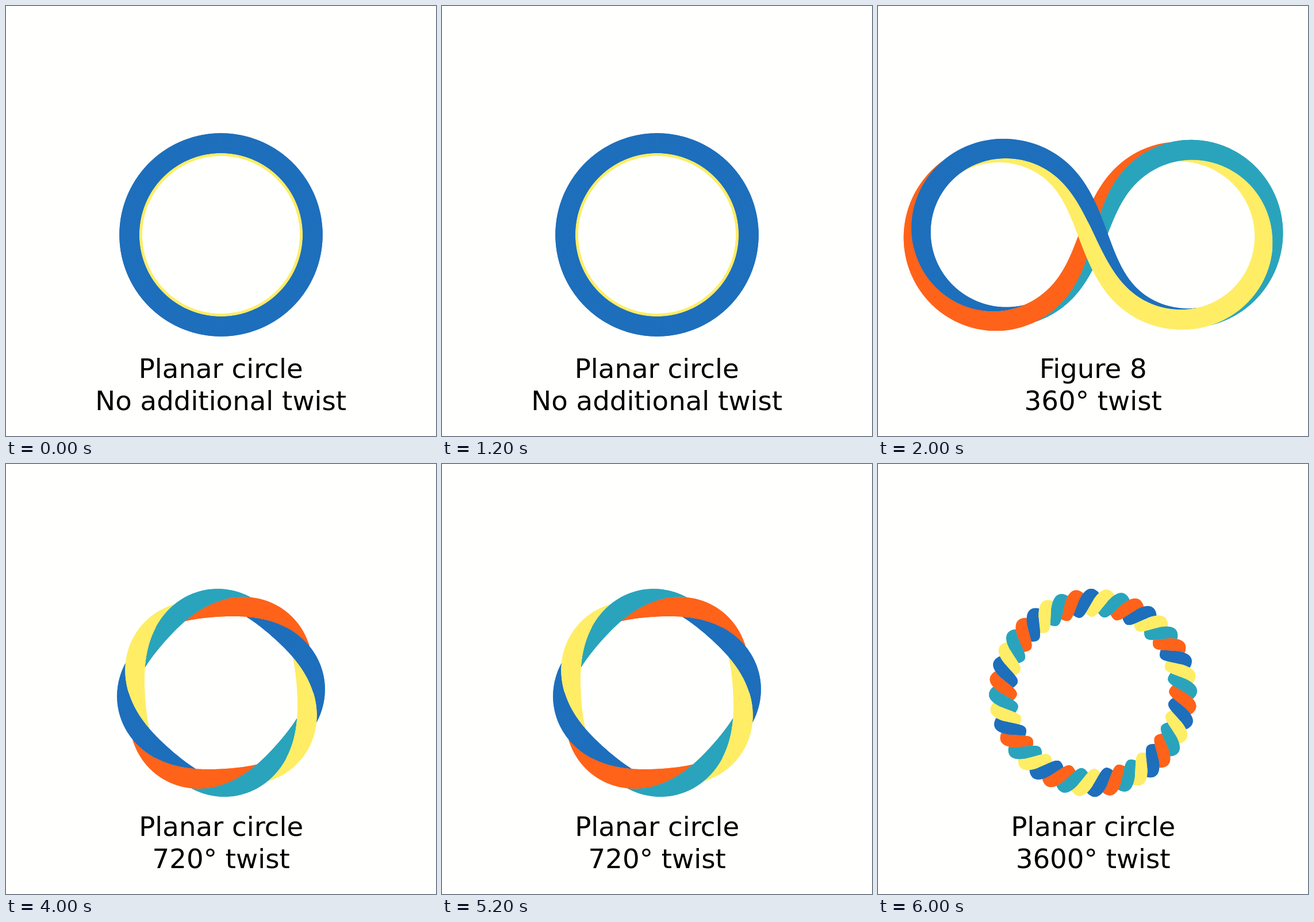
Recreate the animation shown at these times as an HTML page with a canvas. Size 748x748 px, loop 8 s.

```html
<!DOCTYPE html>
<html lang="en">
<head>
<meta charset="utf-8">
<title>Twist and writhe</title>
<style>
html, body { margin: 0; height: 100%; overflow: hidden; background: #fffffd; }
canvas { display: block; }
</style>
</head>
<body>
<canvas id="stage" width="748" height="748"></canvas>
<script>
const ctx = document.getElementById("stage").getContext("2d");
const COLORS = ["#1e6fbc", "#ffed66", "#2aa4bc", "#ff631a"]; // in order around the bar
const HOLD = 2000, STEPS = 720, CAMERA = 960;
const CORNER = 17 * Math.SQRT2; // bar axis to edge
const { PI, sin, cos, abs } = Math;

// Each path gives the axis point, the sideways normal and the roll of the bar.
function circle(turns, roll) {
  return u => {
    const a = 2 * PI * u, nx = cos(a), ny = sin(a);
    return { x: 156.6 * nx, y: 156.6 * ny, z: 0, nx, ny, roll: roll - turns * a };
  };
}

// Two round loops; the strands straighten out gradually towards the crossing.
function figureEight(u) {
  const r = 146, ease = 113, slope = 1.2114, lift = 28;
  const heading = d => slope - (d < ease ? d * d / (2 * ease) : d - ease / 2) / r;
  const apex = ease / 2 + r * slope, quarter = apex + r * PI / 2;
  const s = (4 * u - 1) * quarter;
  const upper = s <= quarter;
  const t = upper ? s : s - 2 * quarter;
  const d = abs(t), side = t < 0 ? -1 : 1, over = upper ? 1 : -1;
  let x = 0, y = 0;
  for (let i = 0, n = 200; i < n; i++) {
    const h = heading((i + 0.5) * d / n);
    x += cos(h) * d / n;
    y += sin(h) * d / n;
  }
  const z = d < apex ? lift * cos(PI / 2 * d / apex) ** 2 : 0;
  const h = heading(d);
  return {
    x: over * side * x, y: side * y, z: over * z,
    nx: sin(h), ny: -over * cos(h),
    roll: 0.715 - PI / 2 * s / quarter
  };
}

const SCENES = [
  { path: circle(0, PI / 2), text: ["Planar circle", "No additional twist"], x: 373.7 },
  { path: figureEight, text: ["Figure 8", "360° twist"], x: 374.2 },
  { path: circle(2, PI / 4), text: ["Planar circle", "720° twist"], x: 374.2 },
  { path: circle(10, PI * 5 / 4), text: ["Planar circle", "3600° twist"], x: 374.2 }
];

function project(p, angle) {
  const out = CORNER * cos(angle), z = p.z + CORNER * sin(angle);
  const k = CAMERA / (CAMERA - z);
  return { x: 374 + k * (p.x + out * p.nx), y: 398 + k * (p.y + out * p.ny), z };
}

function bar(path) {
  const rings = Array.from({ length: STEPS }, (_, i) => {
    const p = path(i / STEPS);
    return COLORS.map((_, k) => project(p, p.roll + (k - 0.5) * PI / 2));
  });
  const quads = [];
  rings.forEach((a, i) => {
    const b = rings[(i + 2) % STEPS]; // overlap by one step to hide seams
    COLORS.forEach((color, k) => {
      const n = (k + 1) % 4, pts = [a[k], a[n], b[n], b[k]];
      const [p, q, r, s] = pts;
      const facing = (r.x - p.x) * (s.y - q.y) - (r.y - p.y) * (s.x - q.x) < 0;
      if (facing) quads.push({ color, pts, z: p.z + q.z + r.z + s.z });
    });
  });
  return quads.sort((a, b) => a.z - b.z);
}

function draw({ path, text, x }) {
  ctx.fillStyle = "#fffffd";
  ctx.fillRect(0, 0, 748, 748);
  for (const { color, pts } of bar(path)) {
    ctx.fillStyle = color;
    ctx.beginPath();
    pts.forEach(p => ctx.lineTo(p.x, p.y));
    ctx.fill();
  }
  ctx.fillStyle = "#000";
  ctx.font = '46.67px "DejaVu Sans", sans-serif';
  ctx.textAlign = "center";
  ctx.fillText(text[0], x, 647);
  ctx.fillText(text[1], x, 702.5);
}

let shown = -1;
const start = performance.now();
function tick() {
  const i = Math.floor((performance.now() - start) / HOLD) % SCENES.length;
  if (i !== shown) draw(SCENES[shown = i]);
  requestAnimationFrame(tick);
}
tick();
</script>
</body>
</html>
```
